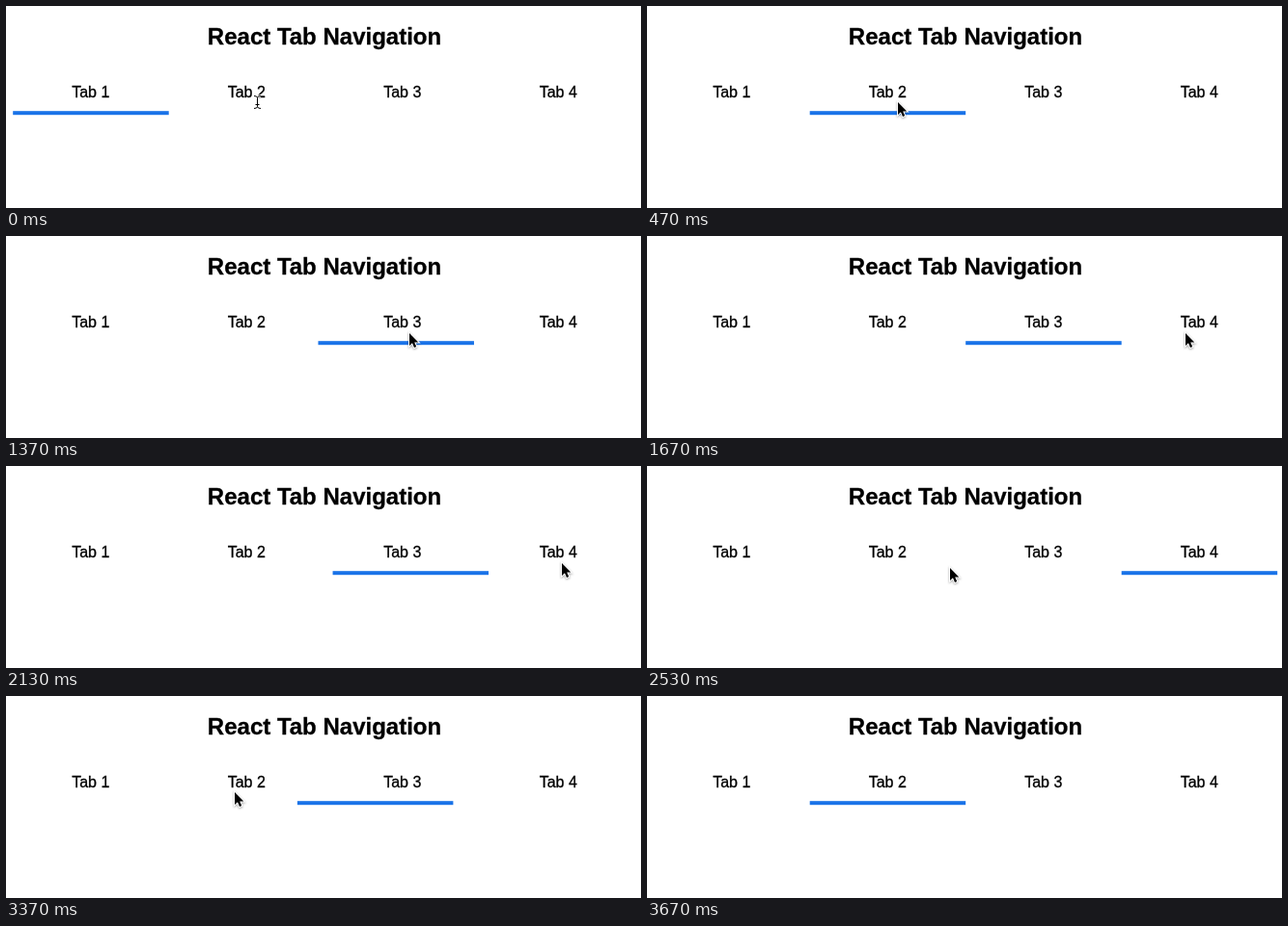
Animation of 658x210 px, one loop 5.46 s. Source, as an HTML page:

```html
<!DOCTYPE html>
<html lang="en">
<head>
<meta charset="utf-8">
<title>React Tab Navigation</title>
<style>
  html, body { margin: 0; width: 100%; height: 100%; overflow: hidden; background: #fff; }
  svg { display: block; width: 658px; height: 210px; }
  text {
    font-family: "Liberation Sans", Arial, Helvetica, sans-serif; font-size: 16px;
    text-anchor: middle; stroke: #000; stroke-width: .3px;
  }
  .title { font-size: 24px; font-weight: bold; }
  #arrow { filter: drop-shadow(0 1px 1px rgba(0, 0, 0, .35)); }
</style>
</head>
<body>
<svg viewBox="0 0 658 210">
  <defs>
    <path id="ibeam" d="M-3 -6.5Q.5 -6.5 .5 -4.5V4.5Q.5 6.5 -3 6.5M4 -6.5Q.5 -6.5 .5 -4.5M4 6.5Q.5 6.5 .5 4.5M-1.5 2.5H2.5"/>
  </defs>
  <text class="title" x="330" y="40">React Tab Navigation</text>
  <g id="tabs"></g>
  <rect id="bar" y="109.2" width="161.5" height="4" fill="#1a73e8"/>
  <g id="cursor">
    <path id="arrow" d="M0 0V13L3 10.3L5 15L7.2 14L5.2 9.4H9.3Z"
      stroke="#fff" stroke-width="2" paint-order="stroke"/>
    <g id="beam" fill="none">
      <use href="#ibeam" stroke="#fff" stroke-width="2.4"/>
      <use href="#ibeam" stroke="#000"/>
    </g>
  </g>
</svg>
<script>
const LOOP = 5460, LEFT = 7, TAB = 161.5, SLIDE = 250, BEAM_END = 250;
const $ = id => document.getElementById(id);
const bar = $('bar'), cursor = $('cursor'), arrow = $('arrow'), beam = $('beam');

for (let i = 0; i < 4; i++) {
  const label = document.createElementNS('http://www.w3.org/2000/svg', 'text');
  label.setAttribute('x', LEFT + TAB * (i + 0.5));
  label.setAttribute('y', 95);
  label.textContent = `Tab ${i + 1}`;
  $('tabs').append(label);
}

const clicks = [
  { start: 20, tab: 1 },
  { start: 1184, tab: 2 },
  { start: 2113, tab: 3 },
  { start: 3285, tab: 1 }
];

// Pointer strokes; sag bows the stroke downwards
const home = { x: 260, y: 100 };
const moves = [
  { start: 600, end: 1000, x: 418, y: 101, sag: 6 },
  { start: 1400, end: 1850, x: 576, y: 101, sag: 0 },
  { start: 2190, end: 2910, x: 237, y: 100, sag: 9 },
  { start: 3460, end: 3660, x: 285, y: -20, sag: 0 }
];

// CSS "ease": cubic-bezier(.25, .1, .25, 1)
function ease(p) {
  if (p <= 0) return 0;
  if (p >= 1) return 1;
  const bezier = (s, a, b) => 3 * (1 - s) ** 2 * s * a + 3 * (1 - s) * s * s * b + s ** 3;
  let lo = 0, hi = 1;
  for (let i = 0; i < 24; i++) {
    const mid = (lo + hi) / 2;
    if (bezier(mid, 0.25, 0.25) < p) lo = mid; else hi = mid;
  }
  return bezier(lo, 0.1, 1);
}

function activeTab(t) {
  return clicks.reduce((at, { start, tab }) => at + (tab - at) * ease((t - start) / SLIDE), 0);
}

function pointer(t) {
  let { x, y } = home;
  for (const m of moves) {
    const p = ease((t - m.start) / (m.end - m.start));
    x += (m.x - x) * p;
    y += (m.y - y) * p + m.sag * Math.sin(Math.PI * p);
  }
  return [Math.round(x), Math.round(y)];
}

function draw(t) {
  bar.setAttribute('x', LEFT + 0.2 + TAB * activeTab(t));
  cursor.setAttribute('transform', `translate(${pointer(t)})`);
  beam.setAttribute('display', t < BEAM_END ? 'inline' : 'none');
  arrow.setAttribute('display', t < BEAM_END ? 'none' : 'inline');
}

let origin;
function tick(now) {
  origin ??= now;
  draw((now - origin) % LOOP);
  requestAnimationFrame(tick);
}
draw(0);
requestAnimationFrame(tick);
</script>
</body>
</html>
```
